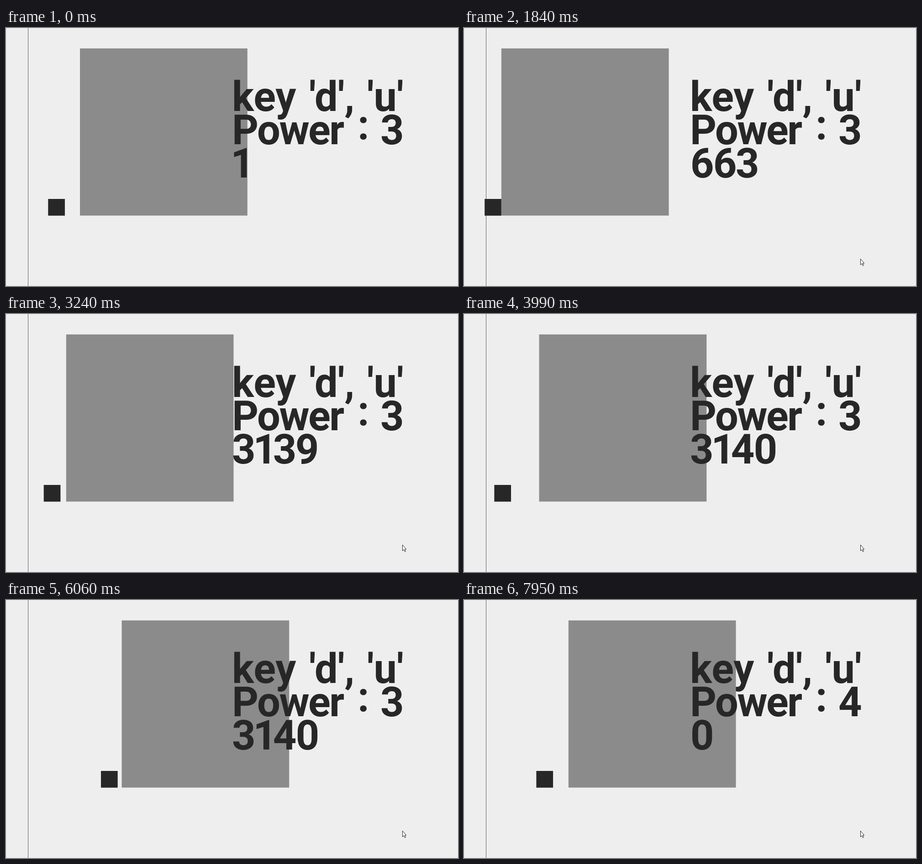
Recreate the animation shown at these times as an HTML page. Size 990 px wide and 566 px high, loop 7990 ms.

```html
<!DOCTYPE html>
<html lang="en">
<head>
<meta charset="utf-8">
<title>Counting collisions</title>
<style>
  html, body { margin: 0; width: 100%; height: 100%; overflow: hidden; background: #eee; }
  svg { display: block; }
  text { font: 700 90px Roboto, sans-serif; fill: #272727; white-space: pre; }
  .tight { letter-spacing: -2.5px; font-variant-numeric: proportional-nums; }
</style>
</head>
<body>
<svg width="990" height="566" viewBox="0 0 990 566">
  <rect x="48" width="1" height="566" fill="#606060"/>
  <rect id="small" y="375" width="36.67" height="36.67" fill="#272727"/>
  <rect id="big" y="44.8" width="366.7" height="366.7" fill="#8b8b8b"/>
  <text x="495" y="182">key</text>
  <text x="664" y="182">'d',</text>
  <text x="791" y="182">'u'</text>
  <text class="tight" x="495" y="255">Power</text>
  <text x="770" y="245">:</text>
  <text id="power" x="820" y="255"></text>
  <text class="tight" id="count" x="495" y="328"></text>
  <path id="cursor" d="M.5 .5V13.5L3.4 10.8L5.5 15.5L7.4 14.6L5.4 10H8.7Z" fill="#fff" stroke="#222"/>
</svg>
<script>
const LOOP = 7990, TICK = 10, WALL = 48.4, SIDE = 36.67, CONTACT = WALL + SIDE;
const SQUEEZE_START = 1745, SQUEEZE_END = 2247, RESTART = 7880;
const approach = [[0, 162], [810, 129], [SQUEEZE_START, 86]];
const retreat = [[SQUEEZE_END, 86], [3240, 131.8], [4750, 197.8], [6060, 253.5],
                 [7280, 309.5], [7750, 330], [RESTART, 330]];
const el = id => document.getElementById(id);
const [small, big, power, count, cursor] = ['small', 'big', 'power', 'count', 'cursor'].map(el);

function along(points, t) {
  const i = Math.max(1, points.findIndex(p => p[0] >= t));
  const [t0, x0] = points[i - 1], [t1, x1] = points[i];
  return x0 + (x1 - x0) * (t - t0) / (t1 - t0);
}

// hits: unfolded billiard phase; odd values are block contacts, even values wall contacts.
function blocks(t) {
  if (t >= SQUEEZE_START && t < SQUEEZE_END) {
    const hits = 110 + 5.825 * (t - SQUEEZE_START);
    const x = 86.9 - 8.2 * Math.sin(hits / 1000);
    return { power: 3, hits, bigX: x, smallX: x - SIDE };
  }
  let bigX, hits;
  if (t < SQUEEZE_START) {
    bigX = along(approach, t);
    hits = 110 / (bigX - CONTACT);
  } else if (t < RESTART) {
    bigX = along(retreat, t);
    hits = 1000 * Math.PI - 108.7 / (bigX - CONTACT);
  } else {
    bigX = 231.7 - (t - RESTART) * 0.041;
    hits = 0;
  }
  const share = 1 - Math.abs(hits % 2 - 1);
  const smallX = WALL + (hits < 1 ? 110 : share * (bigX - CONTACT));
  return { power: t < RESTART ? 3 : 4, hits, bigX, smallX };
}

function draw(t) {
  const s = blocks(t);
  big.setAttribute('x', s.bigX);
  small.setAttribute('x', s.smallX);
  power.textContent = s.power;
  count.textContent = Math.floor(s.hits);
  const left = (1 - Math.min(1, Math.max(0, (t - 200) / 450))) ** 2;
  cursor.setAttribute('transform', `translate(${868 + 43 * left} ${506 + 60 * left})`);
}

function tick() {
  const t = performance.now() % LOOP;
  draw(t - t % TICK);
  requestAnimationFrame(tick);
}
tick();
</script>
</body>
</html>
```
